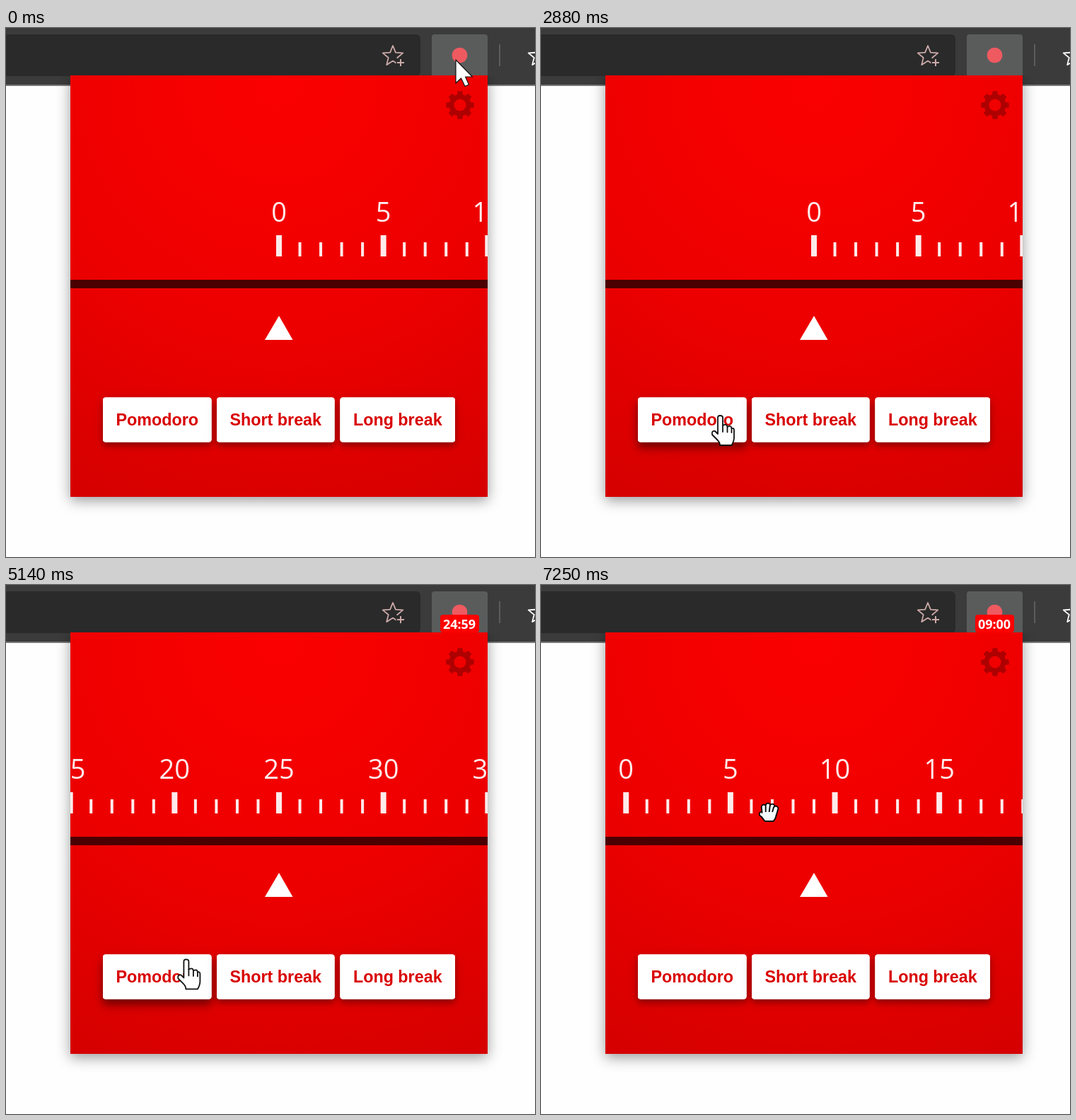
These frames come from a looping animation (748x748 px, 8000 ms). An HTML page with a canvas:

```html
<!DOCTYPE html>
<html lang="en">
<head>
<meta charset="utf-8">
<title>Tomato timer</title>
<style>
html, body { margin: 0; width: 100%; height: 100%; overflow: hidden; background: #fefefe; }
canvas { display: block; }
</style>
</head>
<body>
<canvas id="stage" width="748" height="748"></canvas>
<script>
const ctx = document.getElementById('stage').getContext('2d');
const LOOP = 8000, PITCH = 29.53, MID = 386;
const LEFT = 91, TOP = 67, RIGHT = 681, BOTTOM = 663;
const BUTTONS = [['Pomodoro', 137, 153.5], ['Short break', 298, 166.5], ['Long break', 472.5, 162.5]];

const clamp = x => Math.min(1, Math.max(0, x));
const mix = (a, b, k) => a + (b - a) * k;
const part = (t, from, to) => clamp((t - from) / (to - from));
const smooth = k => k * k * (3 - 2 * k);

// cubic-bezier(.25, .1, .25, 1), solved by bisection
function ease(x) {
  let lo = 0, hi = 1;
  for (let i = 0; i < 24; i++) {
    const s = (lo + hi) / 2;
    if (0.75 * s * (1 - s) + s ** 3 < x) lo = s; else hi = s;
  }
  return 0.3 * lo * (1 - lo) ** 2 + 3 * lo * lo * (1 - lo) + lo ** 3;
}

// from, to, x, y: the pointer glides to x, y within that time
const MOVES = [
  [490, 1270, 543, 258],
  [1290, 1580, 542, 298],
  [2220, 2880, 253, 548],
  [5030, 5660, 270, 322],
  [5880, 6640, 322, 320]
];

function pointerAt(t) {
  if (t > 5000 && t < 5140) t = 5000;
  let x = 636, y = 45;
  for (const [from, to, tx, ty] of MOVES) {
    const k = smooth(part(t, from, to));
    x = mix(x, tx, k);
    y = mix(y, ty, k);
  }
  return [x, y];
}

function dialAt(t) {
  if (t > 3850 && t < 3950) t = 3850;
  const up = 25 * ease(part(t, 3132, 4132));
  return up - 16 * smooth(part(t, 6022, 6742));
}

function badgeAt(t) {
  if (t < 3250) return '';
  if (t >= 7200) return '09:00';
  const left = 1500 - Math.max(0, Math.floor((t - 3310) / 1000));
  const two = n => String(n).padStart(2, '0');
  return two(Math.floor(left / 60)) + ':' + two(left % 60);
}

function pressAt(t) {
  for (const [down, up] of [[3080, 3230], [5870, 7200]]) {
    if (t >= down && t < up) return 0.5;
    if (t >= up && t < up + 50) return 0.25;
  }
  return 0;
}

function box(x, y, w, h, fill, r = 0) {
  ctx.fillStyle = fill;
  ctx.beginPath();
  ctx.roundRect(x, y, w, h, r);
  ctx.fill();
}

function disc(x, y, r, fill) {
  ctx.fillStyle = fill;
  ctx.beginPath();
  ctx.arc(x, y, r, 0, 7);
  ctx.fill();
}

function label(text, x, y, font, fill) {
  ctx.font = font;
  ctx.fillStyle = fill;
  ctx.textAlign = 'center';
  ctx.fillText(text, x, y);
}

function shadow(y, blur, alpha) {
  ctx.shadowOffsetY = y;
  ctx.shadowBlur = blur;
  ctx.shadowColor = `rgba(0,0,0,${alpha})`;
}

function star(x, y, color) {
  ctx.beginPath();
  for (let i = 0; i < 10; i++) {
    const a = i * Math.PI / 5, r = i % 2 ? 6.6 : 15;
    ctx.lineTo(x + r * Math.sin(a), y - r * Math.cos(a));
  }
  ctx.closePath();
  ctx.strokeStyle = color;
  ctx.lineWidth = 1.8;
  ctx.lineJoin = 'round';
  ctx.stroke();
}

function toolbar() {
  box(0, 0, 748, 81, '#3b3b3b');
  box(0, 80, 748, 2, '#777');
  box(-10, 9, 596, 59, '#2a2a2a', 6);
  star(547, 40, '#cba9a8');
  box(551.5, 43, 14, 14, '#2a2a2a');
  box(557, 44, 2, 10, '#cba9a8');
  box(553, 48, 10, 2, '#cba9a8');
  box(602, 9, 79, 60, '#5a5c5c', 4);
  box(697, 23, 2, 31, '#5c5c5c');
  star(753, 40, '#fff');
}

function badge(text) {
  disc(641.5, 38.5, 10.8, '#ee5a60');
  if (!text) return;
  box(614, 42, 55, 25, '#f00', 4);
  label(text, 641, 62, 'bold 18px "Open Sans", "Noto Sans", sans-serif', '#fff');
}

function panel() {
  const w = RIGHT - LEFT, h = BOTTOM - TOP;
  const g = ctx.createRadialGradient(MID, 80, 0, MID, 80, 690);
  g.addColorStop(0, '#fb0000');
  g.addColorStop(0.5, '#ed0000');
  g.addColorStop(1, '#d20000');
  ctx.save();
  ctx.beginPath();
  ctx.rect(0, TOP, 748, 748);
  ctx.clip();
  shadow(5, 18, 0.4);
  box(LEFT, TOP, w, h, g);
  ctx.restore();
}

function gear() {
  ctx.save();
  ctx.translate(642, 109);
  ctx.beginPath();
  const step = Math.PI / 4;
  for (let i = 0; i < 8; i++) {
    for (const [da, r] of [[-0.26, 15.5], [-0.17, 20], [0.17, 20], [0.26, 15.5]]) {
      const a = i * step + da;
      ctx.lineTo(r * Math.sin(a), -r * Math.cos(a));
    }
  }
  ctx.closePath();
  ctx.moveTo(8.5, 0);
  ctx.arc(0, 0, 8.5, 0, 7);
  ctx.fillStyle = '#ae0000';
  ctx.fill('evenodd');
  ctx.restore();
}

function dial(value) {
  ctx.save();
  ctx.beginPath();
  ctx.rect(LEFT, TOP, RIGHT - LEFT, BOTTOM - TOP);
  ctx.clip();
  const white = 'rgba(255,255,255,.92)';
  for (let m = 0; m <= 60; m++) {
    const x = MID + (m - value) * PITCH;
    if (x < LEFT - 30 || x > RIGHT + 30) continue;
    if (m % 5) {
      box(x - 2, 303, 4, 20, white);
    } else {
      box(x - 4, 293, 8, 30, white);
      label(m, x, 274, '38px "Open Sans", "Noto Sans", sans-serif', white);
    }
  }
  ctx.restore();
  box(LEFT, 356, RIGHT - LEFT, 12, '#4a0000');
  ctx.fillStyle = '#fff';
  ctx.fill(new Path2D('M386 407L405.5 441H366Z'));
}

function buttons(hover) {
  BUTTONS.forEach(([text, x, w], i) => {
    const k = i ? 0 : hover;
    const layers = [
      [mix(3.5, 7, k), mix(7, 9, k), mix(0.2, 0.28, k)],
      [mix(7, 11, k), mix(9, 15, k), mix(0.14, 0.18, k)],
      [mix(2, 3, k), 18, 0.12]
    ];
    ctx.save();
    for (const layer of layers) {
      shadow(...layer);
      box(x, 522.5, w, 63, '#fff', 4);
    }
    ctx.restore();
    label(text, x + w / 2, 562, 'bold 23.33px "Liberation Sans", Arial, sans-serif', '#d90000');
  });
}

const ARROW = new Path2D('M0 0V33L7.5 26L13 37.5L18.5 35L13.5 24H23.5Z');
const POINT = new Path2D('M-3 24V3Q-3 0 0 0Q4 0 4 3V14Q10 11 10.5 16Q16 13 16.5 18Q20 17 20 21V31' +
  'Q20 36 16.5 42H0Q0 38 -4 34L-11 27Q-12 21 -7 22L-3 26Z');
const KNUCKLES = new Path2D('M4 14V23M10.5 16V23.5M16.5 18V24');
const OPEN = {
  fingers: [[-16, 0, -6, 8], [-11, -12, -6, 2], [-3, -16, -1, 0], [5, -14, 4, 0], [12, -8, 8, 3]],
  palm: new Path2D('M-9 3L9 2Q10 9 6 14H-6Q-8 9 -12 5Z')
};
const FIST = {
  fingers: [[-10, 4, -5, 7], [-7, -6, -6, 2], [-1, -8, -1, 1], [5, -7, 4, 1], [10, -4, 8, 3]],
  palm: new Path2D('M-8 1L10 1Q10 9 6 13H-5Q-8 9 -11 5Z')
};

function shape(path, line) {
  ctx.fillStyle = '#fff';
  ctx.strokeStyle = '#111';
  ctx.lineWidth = line;
  ctx.fill(path);
  ctx.stroke(path);
}

function hand({ fingers, palm }) {
  shape(palm, 4);
  for (const [x1, y1, x2, y2] of fingers) {
    for (const [width, color] of [[8.4, '#000'], [4.8, '#f4f9fd']]) {
      ctx.beginPath();
      ctx.moveTo(x1, y1);
      ctx.lineTo(x2, y2);
      ctx.lineWidth = width;
      ctx.strokeStyle = color;
      ctx.stroke();
    }
  }
  ctx.fillStyle = '#f4f9fd';
  ctx.fill(palm);
}

function cursor(t, x, y) {
  ctx.save();
  ctx.translate(x, y);
  ctx.lineCap = ctx.lineJoin = 'round';
  if (overButton(x, y)) {
    shape(POINT, 1.8);
    ctx.stroke(KNUCKLES);
  } else if (y > TOP && y < 357) {
    hand(t >= 6500 ? FIST : OPEN);
  } else {
    shape(ARROW, 1.2);
  }
  ctx.restore();
}

const overButton = (x, y) => y > 522 && y < 586 && x > 137 && x < 635;

function draw(t) {
  const [x, y] = pointerAt(t);
  const hover = smooth(part(t, 2700, 2870)) - smooth(part(t, 5190, 5400));
  box(0, 0, 748, 748, '#fefefe');
  toolbar();
  panel();
  badge(badgeAt(t));
  gear();
  dial(dialAt(t));
  buttons(hover);
  cursor(t, x, y);
  const press = pressAt(t);
  if (press) disc(x, y, 23.5, `rgba(255,255,0,${press})`);
}

const start = performance.now();
function tick() {
  draw((performance.now() - start) % LOOP);
  requestAnimationFrame(tick);
}
tick();
</script>
</body>
</html>
```
